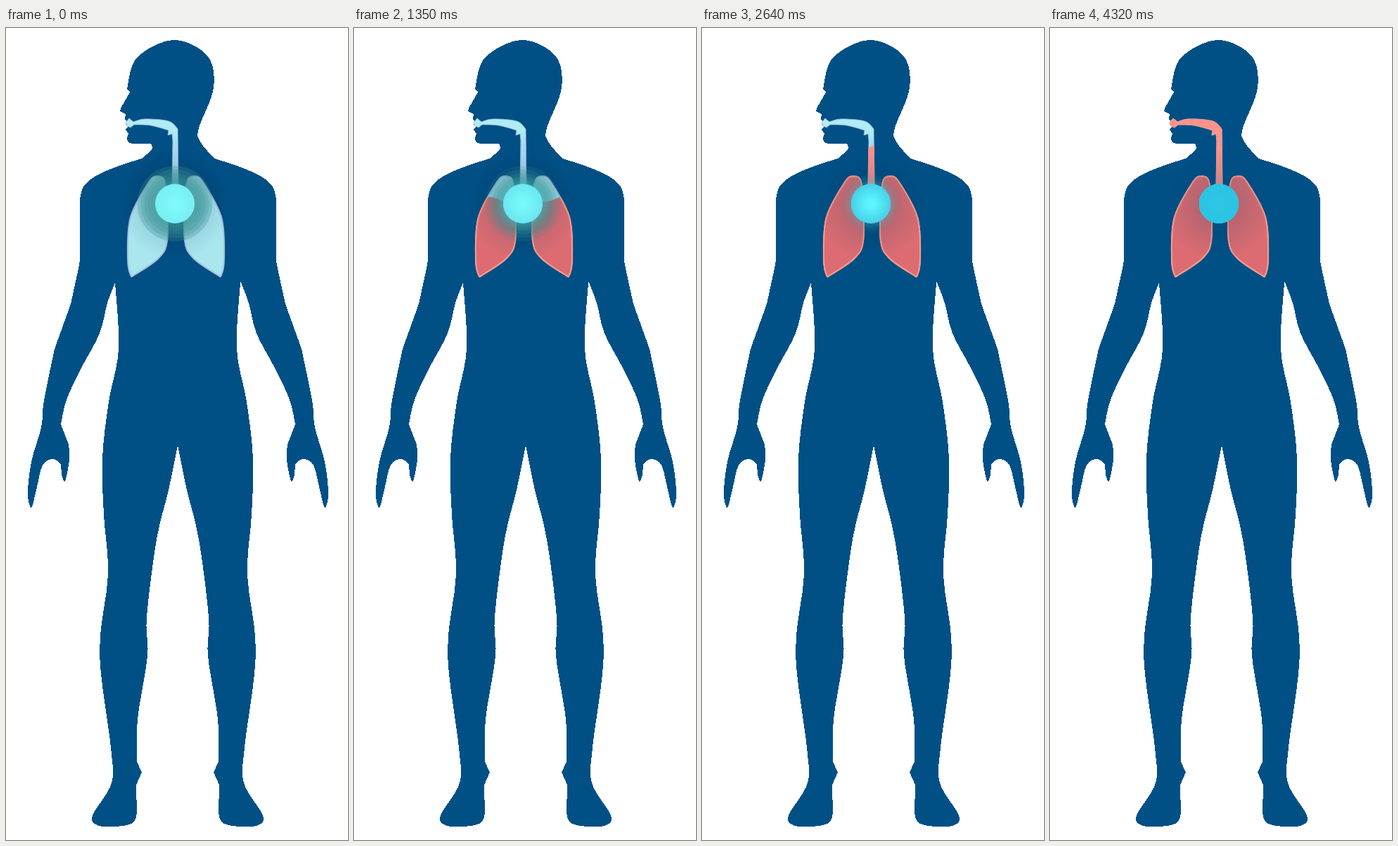
Write an HTML page that moves like this. It is 486 px wide and 1151 px high and loops after 4.5 s.

```html
<!DOCTYPE html>
<html lang="en">
<head>
<meta charset="utf-8">
<title>Breathing</title>
<style>
  html, body { margin: 0; width: 100%; height: 100%; overflow: hidden; background: #fff; }
  svg { display: block; width: 486px; height: 1151px; }
  #body { fill: #005086; shape-rendering: crispEdges; }
  #air .lung { fill: #a9e6ee; stroke: #a9bfe0; stroke-width: 2; }
  #air .pipe { fill: url(#pipeFill); stroke: #a5b9e0; stroke-width: .8; }
  #fluid .lung { fill: #dc6c72; stroke: #ff9a86; stroke-width: 2; }
  #fluid .pipe { fill: #ff9289; stroke: #f89a92; stroke-width: .8; }
</style>
</head>
<body>
<svg viewBox="0 0 486 1151">
  <defs>
    <linearGradient id="pipeFill" gradientUnits="userSpaceOnUse" x1="0" y1="128" x2="0" y2="222">
      <stop offset=".2" stop-color="#b0ecf4"/><stop offset=".4" stop-color="#a8d8f0"/>
    </linearGradient>
    <radialGradient id="shade">
      <stop offset=".35" stop-color="#003c66" stop-opacity=".7"/>
      <stop offset="1" stop-color="#003c66" stop-opacity="0"/>
    </radialGradient>
    <radialGradient id="glow">
      <stop offset=".6" stop-color="#4fd0da" stop-opacity=".6"/>
      <stop offset="1" stop-color="#3a9ca4" stop-opacity="0"/>
    </radialGradient>
    <radialGradient id="orb">
      <stop offset="0" stop-color="#80fcfc"/><stop offset="1" stop-color="#78eef2"/>
    </radialGradient>
    <radialGradient id="rim">
      <stop offset=".2" stop-color="#50f2ff"/><stop offset="1" stop-color="#34c4e4"/>
    </radialGradient>
    <clipPath id="level"><path id="wave"/></clipPath>
  </defs>
  <g id="body"></g>
  <circle id="shadow" cx="240" cy="249" r="80" fill="url(#shade)"/>
  <g id="air"></g>
  <g id="fluid" clip-path="url(#level)"></g>
  <circle id="tint" cx="240" cy="249" r="80" fill="url(#shade)"/>
  <g id="rings" fill="#3a8e8e"></g>
  <circle id="halo" cx="240" cy="249" r="43" fill="url(#glow)"/>
  <circle cx="240" cy="249" r="28" fill="url(#orb)"/>
  <circle id="edge" cx="240" cy="249" r="28" fill="url(#rim)"/>
  <circle id="dim" cx="240" cy="249" r="28" fill="#2cc3e4"/>
</svg>
<script>
const LOOP = 4500, LAST = 4320, STEP = 30;
const $ = id => document.getElementById(id);
const clamp = v => Math.max(0, Math.min(1, v));
const fade = (id, opacity) => $(id).setAttribute('opacity', opacity);

function add(parent, tag, attrs) {
  const el = document.createElementNS('http://www.w3.org/2000/svg', tag);
  for (const key in attrs) el.setAttribute(key, attrs[key]);
  parent.append(el);
  return el;
}

// Smooth curve through the key points; "/" marks a sharp corner.
function outline(text) {
  return text.split('/').map((chain, n) => {
    const p = chain.trim().split(/\s+/).map(s => s.split(',').map(Number));
    let d = (n ? 'L' : 'M') + p[0];
    for (let i = 0; i < p.length - 1; i++) {
      const a = p[i - 1] || p[i], b = p[i], c = p[i + 1], e = p[i + 2] || c;
      const c1 = b.map((v, k) => v + (c[k] - a[k]) / 6);
      const c2 = c.map((v, k) => v - (e[k] - b[k]) / 6);
      d += `C${c1} ${c2} ${c}`;
    }
    return d;
  }).join('') + 'Z';
}

function addPair(parent, d, sum, cls = '') {
  add(parent, 'path', { d, class: cls });
  add(parent, 'path', { d, class: cls, transform: `matrix(-1 0 0 1 ${sum} 0)` });
}

const head = outline(
  `172,86 186,42 238,17 286,39 295,85 274,142 276,161 297,186 / 297,230 193,230 / 193,185 207,172 206,164
   / 189,164 176,163 172,157 174,150 / 170,144 173,140 / 170,137 172,133 / 169,129 170,122 / 162,118 164,112 / 176,91`);
const arm = outline(
  `193,185 159,196 127,210 110,225 105,243 / 105,330 101,350 92,391 / 69,455 54,528 50,566 36,615 31,660 36,680 43,655 52,620 67,611 78,618
   / 79,634 84,642 90,612 89,590 / 78,562 86,527 107,482 133,433 144,390 155,361 / 190,300`);
const trunk = outline(
  `193,185 140,230 / 155,361 160,455 146,530 137,610 139,690 145,775 133,885 149,1020 150,1070
   123,1116 130,1130 155,1132 180,1127 186,1113 / 185,1073 193,1055 / 186,1040 187,980 201,890 200,835 214,725 231,655 243.5,594 / 246,594 246,185`);
const lung = outline(
  `215,210 225,215 229,245 229,302 217,326 184,349 177,350 173,325 177,268 204,217 215,210`);
const pipe = outline(
  `170,134 / 175,128 / 181,133 198,129 231,132 244,143 / 245,226 236,226 / 237,160 236,150 / 230,152 / 231,145 205,138 182,137 / 177,141 / 172,139`);

add($('body'), 'path', { d: head });
addPair($('body'), arm, 489);
addPair($('body'), trunk, 488);
for (const id of ['air', 'fluid']) {
  addPair($(id), lung, 483, 'lung');
  add($(id), 'path', { d: pipe, class: 'pipe' });
}
const rings = [0, 1, 2, 3, 4].map(i =>
  add($('rings'), 'circle', { cx: 240, cy: 249, r: 53.5 - 5 * i }));

function draw(now) {
  const t = Math.min(LAST, Math.floor((now % LOOP) / STEP) * STEP);
  const level = 126.5 + 238 * (1 - t / LOOP) ** 2;
  const trough = 193 + 52 * (t - 810) / 1080;
  const swell = 3.5 * clamp((LAST - t) / 800);
  let d = 'M150 400';
  for (let x = 150; x <= 330; x += 3) {
    d += `L${x} ${(level + swell * Math.cos((x - trough) * 2 * Math.PI / 52)).toFixed(2)}`;
  }
  $('wave').setAttribute('d', d + 'L330 400Z');

  // Outer rings vanish first.
  rings.forEach((ring, i) =>
    ring.setAttribute('opacity', (.3 - .04 * i) * clamp((2000 + 200 * i - t) / 1200)));
  fade('shadow', .8 * clamp(1 - t / 4600));
  fade('tint', .25);
  fade('halo', .2 + .6 * clamp(t / 1800) - .75 * clamp((t - 1900) / 2420));
  fade('edge', .9 * clamp((t - 900) / 2200));
  fade('dim', .95 * clamp((t - 2600) / 1720) ** 1.3);
}

const start = performance.now();
function tick() {
  draw(performance.now() - start);
  requestAnimationFrame(tick);
}
tick();
</script>
</body>
</html>
```
